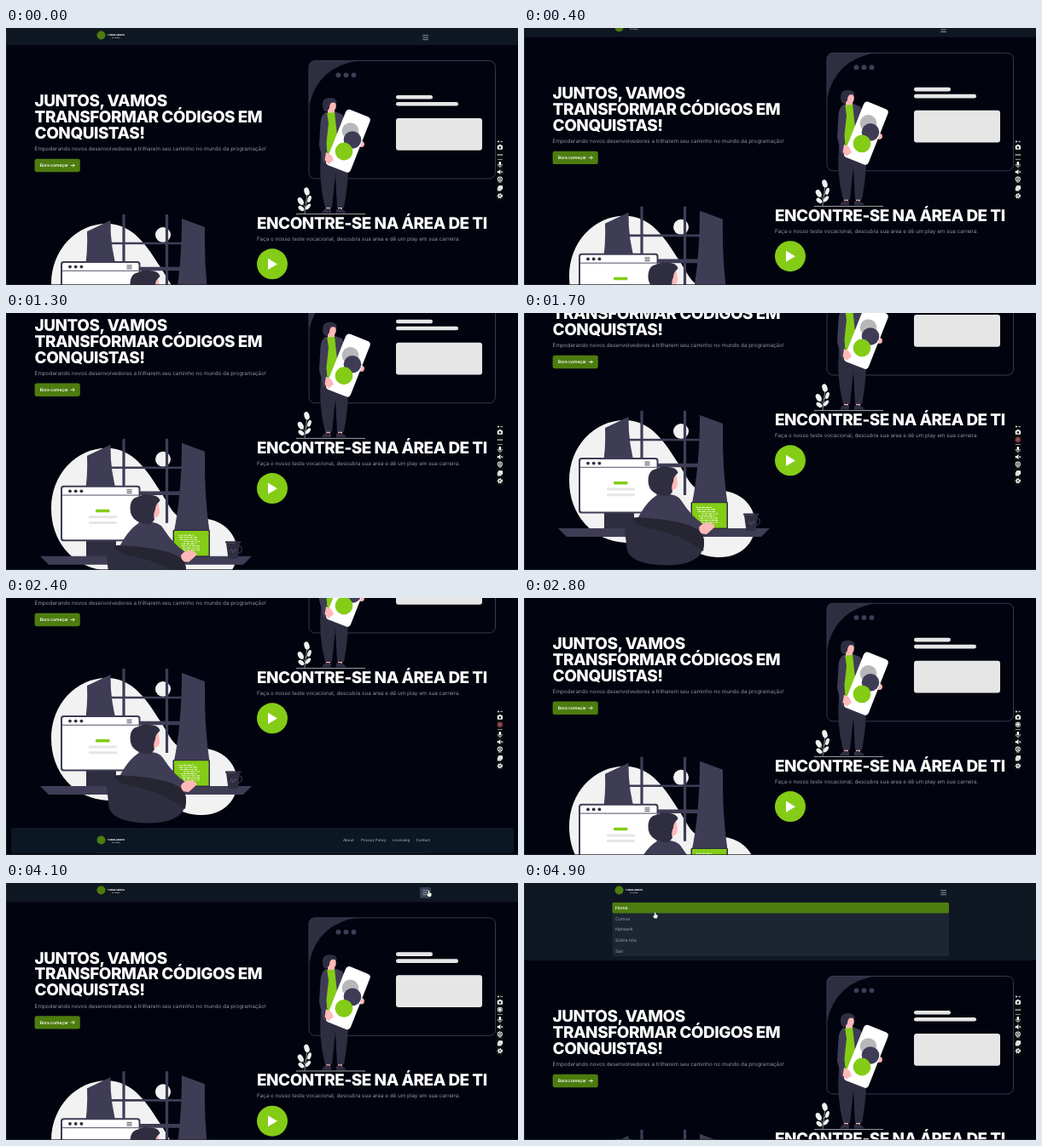
Animation, 600 px wide and 302 px high, one loop 5000 ms. Source, as an HTML page with a canvas:

```html
<!DOCTYPE html>
<html lang="pt-BR">
<head>
<meta charset="utf-8">
<title>Aprenda a programar</title>
<style>
  html, body { margin: 0; width: 100%; height: 100%; overflow: hidden; background: #01040f; }
  canvas { display: block; width: 600px; height: 302px; }
</style>
</head>
<body>
<canvas id="stage" width="600" height="302"></canvas>
<script>
const ctx = document.getElementById('stage').getContext('2d');
const W = 600, H = 302, LOOP = 5000, STEP = 100;
const BG = '#01040f', NAV = '#0f1723', PANEL = '#1b2632', GREEN = '#84cc16', MOSS = '#4d7c0f';
const INK = '#2f2e41', PLUM = '#3f3d56', SHADE = '#262532', PALE = '#e6e6e6', CLOUD = '#f2f2f2';
const SKIN = '#ffb8b8', GRAY = '#9ca3af', MUTED = '#8f95a2';
const TITLE = 18.95, BODY = 6.3;

ctx.textRendering = 'geometricPrecision';

const clamp = v => Math.max(0, Math.min(1, v));
const smooth = v => { v = clamp(v); return v * v * (3 - 2 * v); };

function fill(color, d) { ctx.fillStyle = color; ctx.fill(new Path2D(d)); }

function line(color, width, d) {
  ctx.strokeStyle = color;
  ctx.lineWidth = width;
  ctx.stroke(new Path2D(d));
}

function box(color, x, y, w, h, r = 0) {
  ctx.fillStyle = color;
  ctx.beginPath();
  ctx.roundRect(x, y, w, h, r);
  ctx.fill();
}

function oval(color, x, y, rx, ry = rx, turn = 0) {
  ctx.fillStyle = color;
  ctx.beginPath();
  ctx.ellipse(x, y, rx, ry, turn, 0, Math.PI * 2);
  ctx.fill();
}

function text(str, x, y, size, color, weight = 400, tracking = 0) {
  ctx.font = `${weight} ${size}px Inter, "Liberation Sans", sans-serif`;
  ctx.letterSpacing = `${tracking * size}px`;
  ctx.fillStyle = color;
  ctx.fillText(str, x, y);
}

function shifted(dy, draw) {
  ctx.save();
  ctx.translate(0, dy);
  draw();
  ctx.restore();
}

// Scroll distance: slow way down, quick way back up.
const stops = [[0, 0], [800, 30.5], [1700, 104], [2400, 136]];

function scrollAt(t) {
  if (t >= 2400) return 136 * (1 - smooth((t - 2400) / 585));
  const slope = i => {
    const a = stops[i - 1], b = stops[i + 1];
    return a && b ? (b[1] - a[1]) / (b[0] - a[0]) : 0;
  };
  const i = stops.findIndex((s, k) => t < stops[k + 1][0]);
  const [t0, y0] = stops[i], [t1, y1] = stops[i + 1];
  const span = t1 - t0, s = (t - t0) / span;
  return y0 + (y1 - y0) * smooth(s)
    + span * (slope(i) * s * (1 - s) ** 2 - slope(i + 1) * s * s * (1 - s));
}

const menuAt = t => 71 * clamp((t - 4080) / 110) ** 2;

function logo(y) {
  oval(MOSS, 111.5, y, 5);
  text('TURMA ABERTA', 119, y, 2.5, '#fff', 800);
  text('de código', 124, y + 3, 2, '#cbd5e1', 500);
}

function nav(menu, t) {
  box(NAV, 0, 0, W, 20 + menu);
  logo(8.5);
  if (t >= 3900 && t < 4300) box('#374151', 485, 5, 13, 13, 2.5);
  line(GRAY, 0.9, 'M488.3 8.7h6.6M488.3 11.2h6.6M488.3 13.7h6.6');
  if (menu < 5) return;
  box(PANEL, 103.5, 22.5, 394.5, 63.5, 2.5);
  box(MOSS, 103.5, 23, 394.5, 12.5, 1.5);
  ['Home', 'Cursos', 'Network', 'Sobre nós', 'Sair'].forEach((item, i) =>
    text(item, 107, 31.1 + i * 12.6, 5.15, i ? GRAY : '#fff', i ? 400 : 500));
}

function card() {
  ctx.save();
  ctx.beginPath();
  ctx.roundRect(355, 38.5, 218.5, 138.5, 7);
  ctx.clip();
  fill(INK, 'M355 38H414Q365 45 355 92Z');
  ctx.restore();
  ctx.strokeStyle = PLUM;
  ctx.lineWidth = 0.9;
  ctx.beginPath();
  ctx.roundRect(355, 38.5, 218.5, 138.5, 7);
  ctx.stroke();
  for (let i = 0; i < 3; i++) oval(PLUM, 389.5 + i * 9, 55.3, 2.9);
  box(PALE, 457, 79, 43, 4.6, 2.3);
  box(PALE, 457, 87, 73, 4.6, 2.3);
  box(PALE, 457, 106, 101, 37.7, 3);
}

function plant() {
  line(CLOUD, 0.6, 'M353 192Q352 205 350 218M346 205L351 211M355 201L351 206');
  oval(CLOUD, 352.5, 192, 3, 4.8, -0.3);
  oval(CLOUD, 355.5, 201, 2.1, 4.2, 0.3);
  oval(CLOUD, 345.3, 203.5, 3, 4.8, -0.5);
  oval(CLOUD, 354, 210, 2.1, 4.2, 0.7);
  oval(CLOUD, 346, 212, 2.4, 4, -0.9);
}

function standingMan() {
  line('#c9c9cf', 0.8, 'M340 218.6H421');
  plant();
  fill(SKIN, 'M375 208h5v6h-5zM389 208h5v6h-5z');
  fill(INK, 'M369 148L401 150Q402 180 396 211H388L386 172L382 211H374Q366 180 369 148Z');
  fill(INK, 'M373 213Q377 211 381 213V217.5H370Q371 215 373 213ZM387 213Q391 211 394 213Q398 215 399 217.5H387Z');
  fill(SKIN, 'M377 94h8v8h-8z');
  fill(GREEN, 'M375 100L386 99L391 122L386 150H377L372 120Z');
  fill(PLUM, 'M376 98.5Q369 101 368.5 112L367 138L372 158L377 159L375.5 135L378 112Z');
  fill(PLUM, 'M385 98L394 101.5L400 113L392 140L388 126Z');
  oval(SKIN, 381, 92, 5.8, 7.4, 0.15);
  fill(INK, 'M371 92Q370 82 379 82Q387 81.5 388 88L382 87.5Q379 89 379 94L376 98.5Q371.5 98 371 92Z');
  oval(SKIN, 416.5, 136.5, 3.4, 3.6);
  fill('#fff', 'M403.5 96L424 104.3Q428 106 426.4 110L404 167Q402.4 171 398.7 169.6L377.5 161.2Q374 159.7 375.5 155.6L398 98.7Q399.7 94.6 403.5 96Z');
  oval('#b8b8bb', 403.5, 121, 9.8);
  oval(PLUM, 406, 131.5, 10.3);
  oval(GREEN, 396, 145, 10.4);
  fill(SKIN, 'M375 146L381 149L384 155L378 160L373.5 155Z');
}

function windowView() {
  fill(CLOUD, 'M53 165C53 125 82 94 118 94C150 94 166 122 181 145'
    + 'C193 163 197 180 218 177C250 173 271 192 271 216C271 240 252 255 230 255'
    + 'C205 255 195 244 185 238H120C80 236 53 205 53 165Z');
  oval(CLOUD, 184, 107, 9);
  line(PLUM, 3.2, 'M138 83V150M188.5 83V182');
  line(PLUM, 2.6, 'M121 117H207');
  line(PLUM, 4.6, 'M130 147H207');
  fill(PLUM, 'M95 103L122.5 90Q122 122 131 150H92Q96 128 95 103Z');
  fill(PLUM, 'M206 88L233 98Q232 150 239 196H196Q206 150 206 88Z');
}

function monitor() {
  fill(INK, 'M94 202H129V222H94Z');
  box(PLUM, 64, 138, 93.5, 65.5, 3.5);
  box('#fff', 66, 140, 89.5, 61.5, 2);
  line(PLUM, 0.9, 'M66 149.3H155.5');
  for (let i = 0; i < 3; i++) oval(INK, 75 + i * 6.7, 144.6, 1.9);
  line(INK, 0.8, 'M141.5 143H147.5M141.5 144.9H147.5M141.5 146.8H147.5');
  box(GREEN, 105, 166, 16.5, 3.4, 1.2);
  box(PALE, 97, 173.6, 33, 3, 1);
  box(PALE, 97, 180.2, 33, 3, 1);
}

function laptop() {
  box(INK, 195.5, 190, 43.5, 32, 1.5);
  box(GREEN, 197, 191.2, 40.5, 29.3, 0.5);
  for (let row = 0; row < 8; row++) {
    let x = 202 + (row * 5 % 4) + (row > 2 ? 3 : 0);
    for (let k = 0; k < 5; k++) {
      const w = 1.6 + (row * 3 + k * 5) % 4 * 0.9;
      box('#f4fbe8', x, 196 + row * 2.5, w, 0.95);
      x += w + 1.2;
    }
  }
}

function mug() {
  line(INK, 1.4, 'M273 209Q277.5 209.5 276 214.5Q274 218 272 217');
  box(INK, 257, 203.5, 18.5, 2.2, 0.6);
  fill(INK, 'M258 205.5H274L271.5 224H260.5Z');
  line('#5d5b70', 0.7, 'M262 216L264.5 212.5L266 217L268.5 212.5L270 215');
}

function seatedCoder() {
  windowView();
  monitor();
  fill(PLUM, 'M40 221H288L278 231H50Z');
  laptop();
  mug();
  fill(PLUM, 'M130 216Q142 190 156 182Q177 178 184 188Q196 207 211 217L206 228L150 226Z');
  fill(SKIN, 'M205 220Q210 213 219 215Q224 216 223 220L214 228L206 227Z');
  fill(SKIN, 'M168 156L178 154L180 168Q180 175 174 176L171 182L162 181Z');
  fill(INK, 'M145.5 164Q146 152 156 151Q161 147 168 149Q179 149 180.5 156Q175 160 175 166Q172 172 174 178L170 183Q163 185 154 180Q145 175 145.5 164Z');
  fill(INK, 'M118 222Q118 207 136 208Q180 211 201 221Q212 227 211 240Q208 264 168 264.5Q119 264 120 240Z');
  fill(SHADE, 'M126 209Q180 209 201 221Q212 227 211 240L210 248Q185 229 152 222Q132 219 126 209Z');
}

function footer() {
  box('#0c1724', 6, 406, 589, 30, 2.5);
  line('#1c2735', 0.7, 'M105 435.6H495');
  logo(420.5);
  const links = { About: 395, 'Privacy Policy': 416, Licensing: 453, Contact: 480.5 };
  for (const [name, x] of Object.entries(links)) text(name, x, 422.4, 4.43, GRAY, 500);
}

function page() {
  ['JUNTOS, VAMOS', 'TRANSFORMAR CÓDIGOS EM', 'CONQUISTAS!'].forEach((row, i) =>
    text(row, 33.6, 92.2 + i * 18.9, TITLE, '#fff', 800, -0.025));
  text('Empoderando novos desenvolvedores a trilharem seu caminho no mundo da programação!', 33.6, 144.3, BODY, MUTED);
  box(MOSS, 33.6, 153.8, 53.2, 15.4, 2.6);
  text('Bora começar', 39.8, 163.3, 4.95, '#fff', 600);
  line('#fff', 0.8, 'M75.8 161.5H80.2M78.3 159.5L80.3 161.5L78.3 163.5');

  card();
  standingMan();

  text('ENCONTRE-SE NA ÁREA DE TI', 294, 235.8, TITLE, '#fff', 800, -0.025);
  text('Faça o nosso teste vocacional, descubra sua area e dê um play em sua carreira.', 294, 249.8, BODY, MUTED);
  oval(GREEN, 312, 277.3, 18);
  fill('#fff', 'M307 270.8V284L318 277.4Z');

  shifted(136, seatedCoder);
  footer();
}

// Floating recorder controls
function recorder(t) {
  box('#0b0c10', 574.5, 130.5, 8.5, 72.5, 2);
  oval('#fff', 577, 133.5, 0.9);
  box('#aaa', 579.2, 133, 2.8, 1);
  box('#fff', 575.8, 138, 6.2, 4.8, 1);
  box('#fff', 577.5, 137, 2.8, 2);
  oval('#222', 578.9, 140.4, 1.4);
  if (t < 1600 || t >= 4300) {
    for (let i = 0; i < 3; i++) oval('#fff', 576.7 + i * 2.2, 149, 0.85);
  } else {
    const ring = t < 2600 ? '#b9525a' : '#fff';
    oval(ring, 578.8, 148.8, 3);
    oval('#222', 578.8, 148.8, 2.3);
    oval(ring, 578.8, 148.8, 1.7);
  }
  box('#999', 576, 154, 5.8, 0.9);
  box('#fff', 577.6, 157, 2.5, 4.5, 1.2);
  line('#fff', 0.7, 'M576.3 160Q576.5 163 578.9 163T581.4 160M578.9 163V164.3');
  fill('#fff', 'M575.8 168H577.3L579.4 166V172L577.3 170.2H575.8Z');
  line('#fff', 0.7, 'M580.2 168L582.2 170.4M582.2 168L580.2 170.4');
  oval('#fff', 578.8, 177.5, 3);
  oval('#222', 578.8, 177.5, 2.1);
  oval('#fff', 578.8, 177.5, 1.1);
  box('#ccc', 577, 180.6, 3.8, 0.9);
  box('#fff', 576.8, 185.2, 5.2, 4.6, 0.8);
  box('#ddd', 575.8, 187, 4.8, 4.4, 0.8);
  ctx.setLineDash([1.2, 1.2]);
  ctx.strokeStyle = '#fff';
  ctx.lineWidth = 1.2;
  ctx.beginPath();
  ctx.arc(578.8, 197.3, 2.6, 0, Math.PI * 2);
  ctx.stroke();
  ctx.setLineDash([]);
  oval('#fff', 578.8, 197.3, 2.3);
  oval('#222', 578.8, 197.3, 1);
}

function pointer(t) {
  if (t < 3900) return;
  const p = smooth((t - 4200) / 600);
  ctx.save();
  ctx.translate(495.5 - 342 * p, 9 + 25.5 * p);
  const hand = 'M-0.7 0.2Q0 -0.5 0.7 0.2V2.4L3 3V5.2L2.4 7H-0.8L-2.4 4.2Q-2 3.3 -0.7 4.2Z';
  line('#111', 0.8, hand);
  fill('#fff', hand);
  ctx.restore();
}

function draw(t) {
  const scroll = scrollAt(t), menu = menuAt(t);
  ctx.fillStyle = BG;
  ctx.fillRect(0, 0, W, H);
  shifted(menu - scroll, page);
  shifted(-scroll, () => nav(menu, t));
  recorder(t);
  pointer(t);
  box('#24272f', 0, 0, 0.8, H);
  box('#24272f', 0, H - 0.8, W, 0.8);
}

function tick() {
  const t = performance.now() % LOOP;
  draw(Math.floor(t / STEP) * STEP);
  requestAnimationFrame(tick);
}
tick();
</script>
</body>
</html>
```
